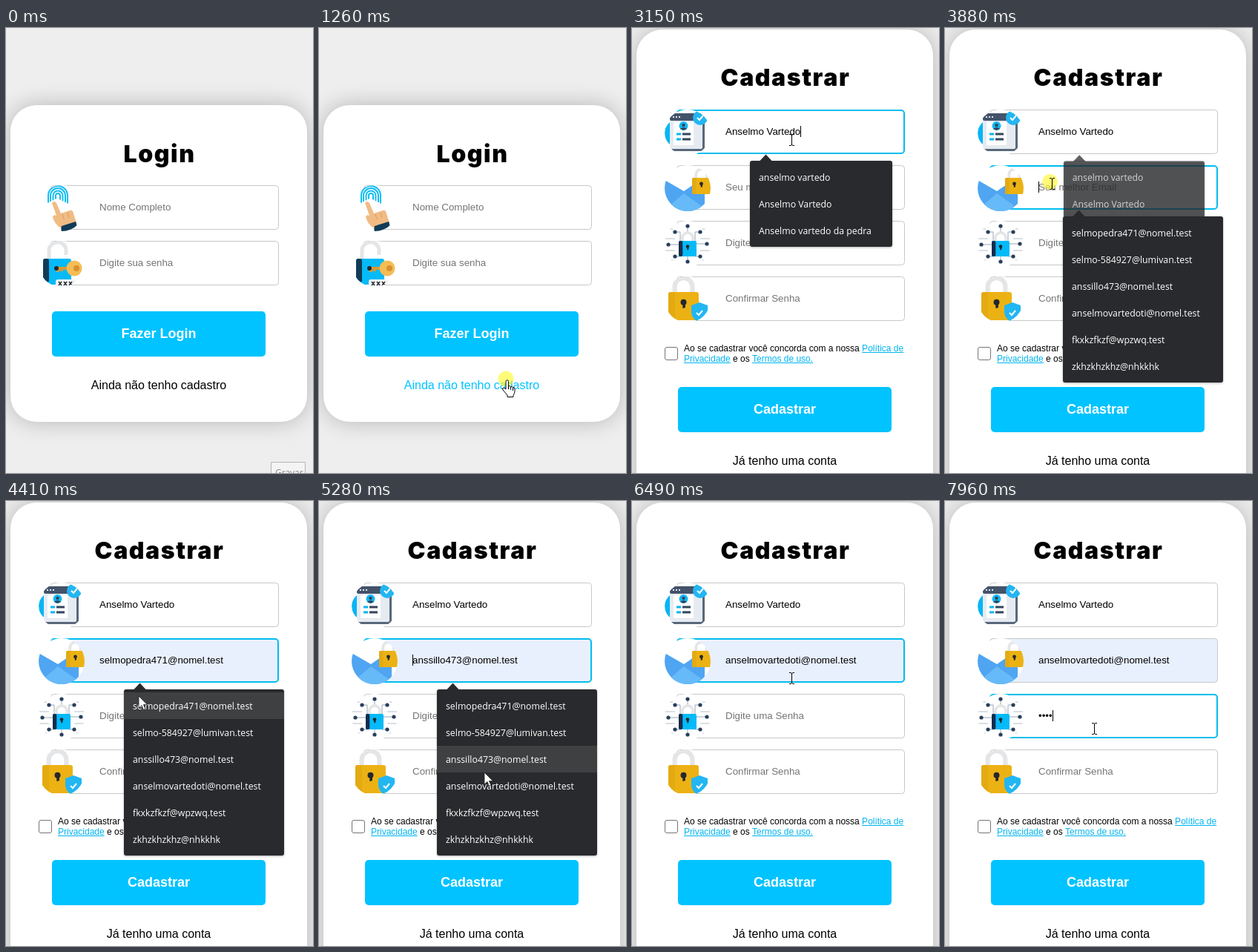
An HTML page with a canvas for the animation above (8000 ms loop, 414x600 px).

```html
<!DOCTYPE html>
<html lang="pt-BR">
<head>
<meta charset="utf-8">
<title>Cadastro</title>
<style>
html, body { margin: 0; width: 100%; height: 100%; overflow: hidden; background: #eee; }
canvas { display: block; }
</style>
</head>
<body>
<canvas id="stage" width="414" height="600"></canvas>
<script>
const ctx = document.getElementById('stage').getContext('2d', { alpha: false });
const LOOP = 8000, BLUE = '#00c3ff', GOLD = '#ecb214', SKIN = '#f0bc84';
const ARIAL = '"Liberation Sans", Arial, sans-serif';
const INPUT = '13.333px ' + ARIAL;
const MENU = '12.3px "Open Sans", "Noto Sans", sans-serif';

const NAME = 'Anselmo Vartedo';
const NAMES = ['anselmo vartedo', NAME, 'Anselmo vartedo da pedra'];
const EMAILS = ['selmopedra471@nomel.test', 'selmo-584927@lumivan.test', 'anssillo473@nomel.test',
  'anselmovartedoti@nomel.test', 'fkxkzfkzf@wpzwq.test', 'zkhzkhzkhz@nhkkhk'];

// Moments of the story, in ms
const PAGE = 1320, FOCUS_NAME = 2410, FILL_NAME = 3150, FOCUS_EMAIL = 3830, OPEN_EMAILS = 3870,
  PICK_EMAIL = 5740, FOCUS_PASS = 6890, TYPE_PASS = [7410, 7610, 7900, 7960];
const CLICKS = [[1260, 60], [2350, 130], [3810, 140], [PICK_EMAIL, 140]];
const MOUSE = [[470, 301, 575], [930, 254, 475], [1740, 254, 475], [1810, 236, 412], [2440, 215, 151],
  [3180, 215, 151], [3810, 143, 209], [3950, 144, 210], [4400, 178, 262], [4800, 205, 309],
  [5280, 223, 365.9], [5670, 231, 393], [5740, 231, 393], [6450, 215, 239], [6500, 215, 239], [6750, 201, 307]];

function shape(d, fill, stroke, width = 1) {
  const path = new Path2D(d);
  if (fill) { ctx.fillStyle = fill; ctx.fill(path); }
  if (stroke) { ctx.strokeStyle = stroke; ctx.lineWidth = width; ctx.stroke(path); }
}

function rect(x, y, w, h, r, fill, stroke, width = 1) {
  ctx.beginPath();
  ctx.roundRect(x, y, w, h, r);
  if (fill) { ctx.fillStyle = fill; ctx.fill(); }
  if (stroke) { ctx.strokeStyle = stroke; ctx.lineWidth = width; ctx.stroke(); }
}

function disc(x, y, r, fill) {
  ctx.beginPath();
  ctx.arc(x, y, r, 0, 7);
  ctx.fillStyle = fill;
  ctx.fill();
}

function text(s, x, y, font, color, align = 'left', spacing = 0) {
  ctx.font = font;
  ctx.fillStyle = color;
  ctx.textAlign = align;
  ctx.letterSpacing = spacing + 'px';
  ctx.fillText(s, x, y);
  return ctx.measureText(s).width;
}

function link(s, x, y, font) {
  const w = text(s, x, y, font, '#00b4f0');
  ctx.fillRect(x, y + 1, w, 1);
  return w;
}

function keyhole(x, y, s) {
  disc(x, y, 3.3 * s, '#24272e');
  shape(`M${x - s} ${y}L${x - s} ${y + 7 * s}L${x + 2 * s} ${y + 6 * s}L${x + 2 * s} ${y}Z`, '#24272e');
}

function padlock(x, y, w, h, body, side) {
  const cx = x + w / 2, r = w * .29, top = y - r * .6;
  shape(`M${cx - r} ${y + 2}V${top}A${r} ${r} 0 0 1 ${cx + r} ${top}V${y + 2}`, null, '#e4e5e7', w * .15);
  rect(x, y, w, h, w * .08, body);
  rect(x, y, w * .22, h, w * .08, side);
  keyhole(cx, y + h * .36, w / 34);
}

function check(x, y, s) {
  shape(`M${x - 4 * s} ${y}l${3 * s} ${3 * s}l${5 * s} ${-6 * s}`, null, '#fff', 2 * s);
}

// Icons are drawn inside a white disc whose box starts at 44, 0
const icons = {
  touch() {
    for (const r of [3, 6.5, 10, 13])
      shape(`M${70 - r} ${17 + r * .5}V14A${r} ${r} 0 0 1 ${70 + r} 14V${18 + r * .5}`, null, '#12bdf2', 2);
    shape('M62 24q3 -4 6 0l6 14l12 -4q4 -1 5 4l4 13l-20 7q-9 -4 -12 -15q1 -4 5 -2z', SKIN);
    shape('M76 39l2 7M83 37l2 7', null, '#d99a62', 1);
    shape('M75 55l19 -6q3 7 0 9l-17 6q-4 -2 -2 -9z', '#113b57');
  },
  key() {
    shape('M58 26V13a11.5 11.5 0 0 1 23 0v6', null, '#e4e5e7', 5);
    rect(50, 24, 38, 35, 3, '#05baf8');
    rect(50, 24, 8, 32, 3, '#113b57');
    shape('M66 37H84M70 37v5M75 37v4', null, '#d99a35', 4);
    disc(92, 37, 10.5, '#f4bd55');
    disc(95, 37, 4, '#d9912f');
    disc(68, 37, 3, '#24272e');
    rect(67, 52, 27, 10, 3, '#f2f3f5');
    shape('M71 55l4 5m0 -5l-4 5M78 55l4 5m0 -5l-4 5M85 55l4 5m0 -5l-4 5', null, '#24272e', 1.5);
  },
  profile() {
    disc(63, 32, 19, '#08b5f3');
    rect(53, 8, 45, 48, 2, '#59687a');
    rect(51, 5, 44, 48, 2, '#e6ebf2');
    rect(51, 5, 44, 10, 2, '#43536a');
    shape('M55 10h2M59 10h2M63 10h2', null, '#dfe6ee', 2);
    rect(56, 17, 27, 31, 1, '#fff');
    disc(69.5, 22, 6, '#11b9f5');
    disc(69.5, 21, 2.2, '#34455c');
    shape('M65 26q4.500 -4 9 0l-4.500 2z', '#34455c');
    shape('M60 33h6M60 40h6', null, '#08b5f3', 3);
    shape('M68 33h11M68 40h11', null, '#34455c', 3);
    disc(92, 11, 10, '#22b6f2');
    check(92, 11, 1);
  },
  mail() {
    shape('M44 20L70 35L86 24L98 32V63H44Z', '#4fa5f2');
    shape('M44 63V60L70 38L98 58V63Z', '#67baf8');
    padlock(81, 17, 25, 22, GOLD, '#e3aa12');
  },
  circuit() {
    const ends = [[58, 15], [49, 32], [58, 48], [92, 15], [101, 31], [92, 48], [75, 7], [75, 55]];
    for (const [x, y] of ends) {
      shape(`M${x} ${y}H${x < 75 ? 65 : x > 75 ? 85 : 75}V32`, null, '#9aa8b5', 1);
      disc(x, y, 2.6, '#273f5c');
    }
    shape('M50 5v6h5M100 5v6h-5M50 59v-6h5M100 59v-6h-5M44 24h14M92 24h14M44 40h14M92 40h14', null, '#b4c1cc', 1);
    rect(66, 15, 18, 16, 7, '#fff');
    padlock(63, 27, 24, 21, '#05baf8', '#152c4d');
  },
  shield() {
    padlock(49, 21, 41, 38, GOLD, '#e3aa12');
    shape('M91 35L102 39V49Q101 58 91 62Q81 58 80 49V39Z', '#22b6f2');
    check(91, 49, 1);
  }
};

function field(y, icon, hint, { value = '', focus = false, auto = false, caret = -1 } = {}) {
  if (focus) rect(61, y + 1, 306, 58, 4, auto ? '#e8f0fe' : '#fff', '#00bdee', 2);
  else rect(60.5, y + .5, 307, 59, 4, auto ? '#e8f0fe' : '#fff', '#c8c8c8');
  text(value || hint, 126, y + 34, INPUT, value ? '#000' : '#757575');
  if (caret >= 0) {
    ctx.fillStyle = '#000';
    ctx.fillRect(Math.round(126 + ctx.measureText(value.slice(0, caret)).width), y + 22, 1, 15);
  }
  ctx.save();
  ctx.translate(0, y);
  ctx.beginPath();
  ctx.arc(75, 31, 31, 0, 7);
  ctx.clip();
  ctx.fillStyle = '#fff';
  ctx.fillRect(44, 0, 62, 62);
  icons[icon]();
  ctx.restore();
}

function card(y, h, title, baseline) {
  ctx.save();
  ctx.shadowColor = 'rgba(0,0,0,.24)';
  ctx.shadowBlur = 30;
  rect(6, y, 400, h, 35, '#fff');
  ctx.restore();
  text(title, 207, baseline, '900 32px Inter, "Open Sans", sans-serif', '#000', 'center', 1.6);
}

function button(y, label) {
  rect(62, y, 288, 61, 5, BLUE);
  text(label, 206, y + 36, 'bold 18px ' + ARIAL, '#fff', 'center');
}

function menu(top, w, rows, alpha, active = -1) {
  if (alpha <= 0) return;
  const h = rows.length * 36 + 8, cx = 159 + w / 2, cy = top + h / 2, scale = .96 + .04 * alpha;
  ctx.save();
  ctx.globalAlpha = alpha;
  ctx.translate(cx, cy);
  ctx.scale(scale, scale);
  ctx.translate(-cx, -cy);
  ctx.shadowColor = 'rgba(0,0,0,.3)';
  ctx.shadowBlur = 3;
  ctx.shadowOffsetY = 1;
  rect(159, top, w, h, 3, '#292a2d');
  ctx.shadowColor = 'transparent';
  shape(`M172 ${top + .5}L180.500 ${top - 8.5}L189 ${top + .5}Z`, '#292a2d');
  rows.forEach((row, i) => {
    if (i === active) rect(159, top + 4 + 36 * i, w, 36, 0, '#3f4042');
    text(row, 171, top + 27 + 36 * i, MENU, '#fff');
  });
  ctx.restore();
}

// Opacity of a menu that opens at once and fades after closing
const fade = (t, open, close, length) =>
  t < open ? 0 : Math.min(1, Math.max(0, 1 - (t - close) / length));

const blink = (t, start) => Math.floor((t - start) / 530) % 2 === 0;

function mouseAt(t) {
  const i = MOUSE.findIndex(k => k[0] > t);
  if (i < 0) return MOUSE[MOUSE.length - 1].slice(1);
  const [t0, x0, y0] = MOUSE[i - 1], [t1, x1, y1] = MOUSE[i], k = (t - t0) / (t1 - t0);
  return [x0 + (x1 - x0) * k, y0 + (y1 - y0) * k];
}

const overMenu = (t, x, y) => t >= OPEN_EMAILS && t < PICK_EMAIL && x >= 159 && y >= 254;

function cursor(t, x, y) {
  const click = CLICKS.find(([at, length]) => t >= at && t < at + length);
  if (click) disc(x - 2, y - 2, 10.5, 'rgba(255,246,30,.6)');
  ctx.save();
  ctx.translate(Math.round(x), Math.round(y));
  const overField = y >= 110 && y < 395 && (y - 110) % 75 < 60;
  if (t >= PAGE && overField && !overMenu(t, x, y)) {
    shape('M-3 -7.500H-1L.5 -6.500L2 -7.500H4M.5 -7V7M-3 7.500H-1L.5 6.500L2 7.500H4', null, '#000');
  } else if (t < PAGE ? y < 490 : y > 405) {
    shape('M-2 12V1.500a1.700 1.700 0 0 1 3.400 0V8q2.800 -1.200 3.200 .8q2.600 -.8 2.900 1q2.500 -.5 2.500 2V15q0 3 -2 5v2.500H0V20L-6 13q-1.400 -3 1.200 -3z',
      '#fff', '#000');
    shape('M1.500 8v4M4.600 9v4M7.500 10v4', null, '#000');
  } else {
    shape('M0 0V16L4 12.500L6.500 18.500L9 17.400L6.400 11.600H11.500Z', '#fff', '#222', .8);
  }
  ctx.restore();
}

function loginPage(t) {
  card(104, 427, 'Login', 181);
  field(212, 'touch', 'Nome Completo');
  field(287, 'key', 'Digite sua senha');
  button(382, 'Fazer Login');
  text('Ainda não tenho cadastro', 206, 487, '16px ' + ARIAL, t >= 900 ? BLUE : '#000', 'center');
  if (t < 70) {
    rect(357.5, 585.5, 46, 20, 0, '#f4f4f4', '#b5b5b5');
    text('Gravar', 363, 604, '12px "Open Sans", sans-serif', '#8a8a8a');
  }
}

function signupPage(t, x, y) {
  card(2, 700, 'Cadastrar', 78);

  const filled = t >= FILL_NAME, nameFocus = t >= FOCUS_NAME && t < FOCUS_EMAIL;
  field(110, 'profile', 'Nome Completo', {
    value: filled ? NAME : '',
    focus: nameFocus,
    caret: nameFocus && blink(t, filled ? FILL_NAME : FOCUS_NAME) ? (filled ? NAME.length : 0) : -1
  });

  const picked = t >= PICK_EMAIL, emailFocus = t >= FOCUS_EMAIL && t < FOCUS_PASS;
  const row = overMenu(t, x, y) ? Math.max(0, Math.floor((y - 258) / 36)) : -1;
  const email = picked ? EMAILS[3] : EMAILS[row] || '';
  field(185, 'mail', 'Seu melhor Email', {
    value: email,
    focus: emailFocus,
    auto: email !== '',
    caret: emailFocus && blink(t, picked ? PICK_EMAIL : FOCUS_EMAIL) ? (picked ? email.length : 0) : -1
  });

  const typed = TYPE_PASS.filter(at => t >= at), passFocus = t >= FOCUS_PASS;
  field(260, 'circuit', 'Digite uma Senha', {
    value: '•'.repeat(typed.length),
    focus: passFocus,
    caret: passFocus && blink(t, typed[typed.length - 1] || FOCUS_PASS) ? typed.length : -1
  });
  field(335, 'shield', 'Confirmar Senha');

  const small = '12px ' + ARIAL;
  rect(44.5, 430.5, 17, 17, 2.5, '#fff', '#767676');
  let w = text('Ao se cadastrar você concorda com a nossa ', 70, 436, small, '#000');
  link('Política de', 70 + w, 436, small);
  w = link('Privacidade', 70, 450, small);
  w += text(' e os ', 70 + w, 450, small, '#000');
  link('Termos de uso.', 70 + w, 450, small);
  button(484, 'Cadastrar');
  text('Já tenho uma conta', 206, 589, '16px ' + ARIAL, '#000', 'center');

  menu(179, 192, NAMES, fade(t, FILL_NAME, FOCUS_EMAIL - 10, 240));
  menu(254, 216, EMAILS, fade(t, OPEN_EMAILS, PICK_EMAIL, 240), row);
  menu(329, 270, ['Sugerir senha forte…'], fade(t, FOCUS_PASS, TYPE_PASS[0], 240));
}

function draw(t) {
  ctx.fillStyle = '#eee';
  ctx.fillRect(0, 0, 414, 600);
  const visible = t >= MOUSE[0][0];
  const [x, y] = visible ? mouseAt(t) : [0, 0];
  if (t < PAGE) loginPage(t);
  else signupPage(t, x, y);
  if (visible) cursor(t, x, y);
}

function tick() {
  draw(performance.now() % LOOP);
  requestAnimationFrame(tick);
}
tick();
</script>
</body>
</html>
```
